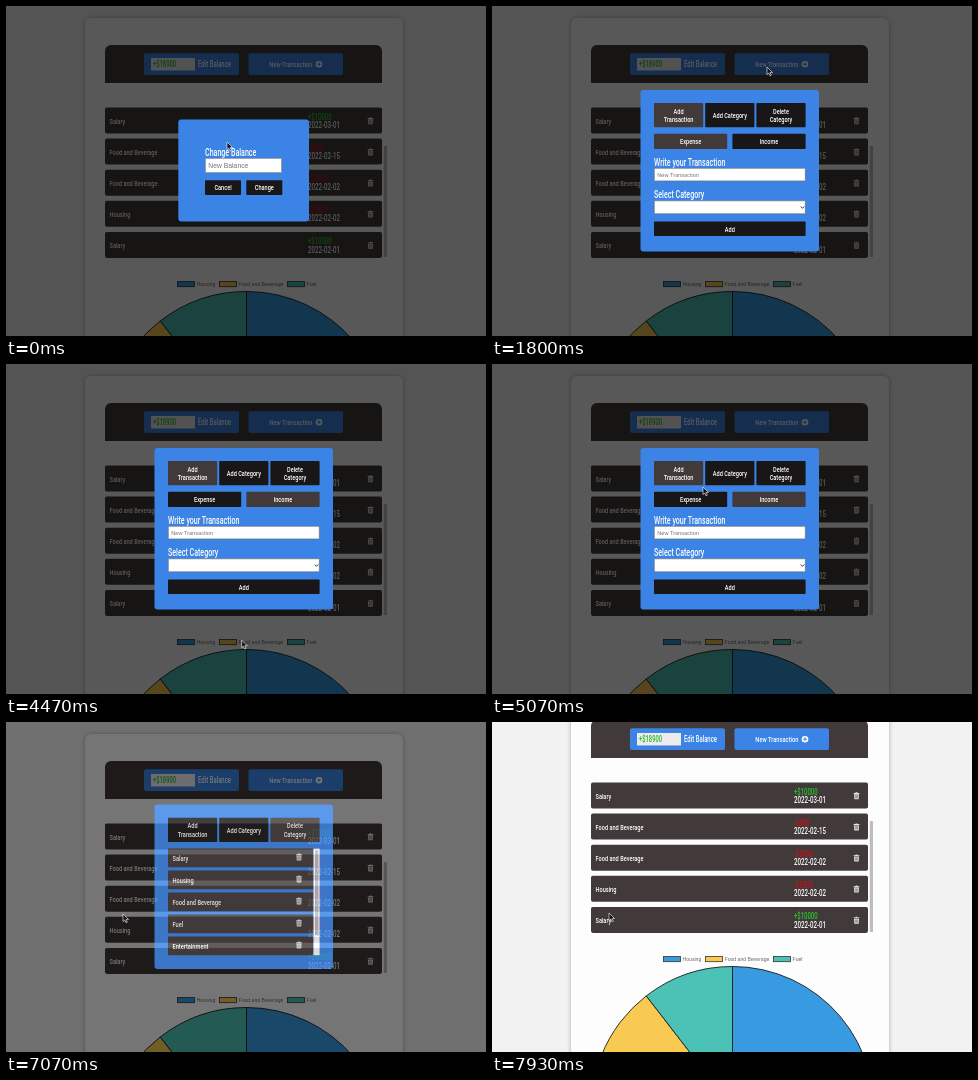
An HTML page that plays this animation: 480x330 px, repeating every 8 s.

```html
<!DOCTYPE html>
<html lang="en">
<head>
<meta charset="utf-8">
<title>Budget tracker</title>
<style>
  html, body { margin: 0; width: 100%; height: 100%; overflow: hidden; background: #f2f2f2; }
  svg { display: block; width: 100%; height: 100%; }
  .ui { font-family: Roboto, "Open Sans", sans-serif; font-weight: 500; }
  .sans { font-family: "Liberation Sans", Arial, sans-serif; }
  .card { filter: drop-shadow(0 0 2px rgba(0, 0, 0, .3)); }
</style>
</head>
<body>
<svg id="stage" viewBox="0 0 480 330" xmlns="http://www.w3.org/2000/svg"></svg>
<script>
const LOOP = 8000;
const BLUE = '#3b84e6', DARK = '#423a3a', BLACK = '#181617';
const CONDENSE = 0.71; // one narrow setting for the whole interface face

// ---- drawing helpers: text is placed by its vertical centre ----
const rect = (x, y, w, h, fill, r = 0, extra = '') =>
  `<rect x="${x}" y="${y}" width="${w}" height="${h}" rx="${r}" fill="${fill}" ${extra}/>`;

const label = (x, y, text, { size = 8, fill = '#fff', anchor = 'start' } = {}) =>
  `<text class="ui" transform="translate(${x} ${y + size * 0.36}) scale(${CONDENSE} 1)"
    font-size="${size}" fill="${fill}" text-anchor="${anchor}">${text}</text>`;

const small = (x, y, text, size, fill) =>
  `<text class="sans" x="${x}" y="${y + size * 0.36}" font-size="${size}" fill="${fill}">${text}</text>`;

const group = (id, body) => `<g id="${id}">${body}</g>`;

const trash = (x, y) => `<g transform="translate(${x} ${y})" fill="#e4e2e2">
  <path d="M-2.9-2.9h1.7l.5-.7h1.4l.5.7h1.7v.9h-5.8z"/>
  <path d="M-2.5-1.6h5l-.3 5h-4.4z"/>
  <path d="M-1.1-.8v3.3M0-.8v3.3M1.1-.8v3.3" stroke="${DARK}" stroke-width=".45"/></g>`;

// A button with one or two centred lines
function button(x, y, w, h, text, fill = BLACK) {
  const lines = text.split('|');
  const first = y + h / 2 - (lines.length - 1) * 4.4;
  return rect(x, y, w, h, fill, 0.8) + lines.map((line, i) =>
    label(x + w / 2, first + i * 8.8, line, { size: 7.9, anchor: 'middle' })).join('');
}

const field = (x, y, w, h, hint, size) =>
  rect(x + 0.3, y + 0.3, w - 0.6, h - 0.6, '#fff', 0.5, 'stroke="#666" stroke-width=".6"') +
  small(x + 3.3, y + h / 2, hint, size, '#757575');

// ---- page ----
function slice(from, to, fill) {
  const cx = 240.5, cy = 426.5, r = 141;
  const rim = deg => {
    const a = deg * Math.PI / 180;
    return `${cx + r * Math.sin(a)} ${cy - r * Math.cos(a)}`;
  };
  const large = to - from > 180 ? 1 : 0;
  return `<path d="M${cx} ${cy}L${rim(from)}A${r} ${r} 0 ${large} 1 ${rim(to)}Z"
    fill="${fill}" stroke="#1c1c1c" stroke-width=".9"/>`;
}

function page() {
  const rows = [
    ['Salary', '+$10000', '2022-03-01'],
    ['Food and Beverage', '-$500', '2022-02-15'],
    ['Food and Beverage', '-$5000', '2022-02-02'],
    ['Housing', '-$5000', '2022-02-02'],
    ['Salary', '+$10000', '2022-02-01'],
  ];
  const legend = [
    [171, 'Housing', '#389be2'],
    [213, 'Food and Beverage', '#f9ca52'],
    [281, 'Fuel', '#4cc2b6'],
  ];
  const header =
    `<path d="M99 77V45a6 6 0 0 1 6-6H370a6 6 0 0 1 6 6V77z" fill="${DARK}"/>` +
    rect(138, 47.3, 95, 21.7, BLUE, 2) +
    rect(145, 52, 44, 12.5, '#ececec') +
    label(147, 58.2, '+$18900', { size: 8.2, fill: '#27b32c' }) +
    label(192, 58.2, 'Edit Balance', { size: 8.4 }) +
    rect(242.5, 47.3, 94.5, 21.7, BLUE, 2) +
    label(263.3, 58.2, 'New Transaction', { size: 8.1 }) +
    `<circle cx="313" cy="58.2" r="3.3" fill="#fff"/>
     <path d="M311.1 58.2h3.8M313 56.3v3.8" stroke="${BLUE}" stroke-width="1"/>`;

  const list = rows.map(([name, amount, date], i) => {
    const y = 101.5 + i * 31.1, mid = y + 13;
    const tint = amount[0] === '+' ? '#25c82d' : '#c81018';
    return rect(99, y, 277, 26, DARK, 1.8) +
      label(103.5, mid + 0.4, name, { size: 7.9 }) +
      label(302, mid - 3.9, amount, { size: 8.4, fill: tint }) +
      label(302, mid + 4.5, date, { size: 8.7 }) +
      trash(364.5, mid + 0.4);
  }).join('');

  const chart = legend.map(([x, name, fill]) =>
    rect(x + 0.4, 275.5, 17, 5.2, fill, 0, 'stroke="#333" stroke-width=".8"') +
    small(x + 19.6, 278.2, name, 5.1, '#666')).join('') +
    slice(0, 200, '#389be2') + slice(200, 322.3, '#f9ca52') + slice(322.3, 360, '#4cc2b6');

  return `<rect class="card" x="79" y="12" width="318" height="600" rx="6" fill="#fdfdfd"/>` +
    header + list + rect(377.8, 140, 3.2, 111, '#bdbdbd', 0.5) + chart;
}

// ---- dialogs ----
const panel = (top, bottom) => rect(148.5, top, 178.5, bottom - top, BLUE, 3);

const tabs = (y, active) => ['Add|Transaction', 'Add Category', 'Delete|Category'].map((text, i) =>
  button(162 + i * 51.2, y, 49.2, 24.3, text, i === active ? DARK : BLACK)).join('');

const kinds = (y, active) => ['Expense', 'Income'].map((text, i) =>
  button(162 + i * 78.4, y, 73.2, 15.3, text, i === active ? DARK : BLACK)).join('');

const heading = (x, y, text) => label(x, y, text, { size: 10 });

const balanceDialog = () =>
  rect(172.3, 113.5, 130.7, 102, BLUE, 3) +
  heading(199, 146.3, 'Change Balance') +
  field(199, 152, 77, 15, 'New Balance', 6.8) +
  button(199, 174.3, 36, 14.7, 'Cancel') +
  button(240.3, 174.3, 36, 14.7, 'Change');

const transactionDialog = () =>
  panel(84, 245.5) + tabs(97, 0) +
  group('expense', kinds(127.7, 0)) + group('income', kinds(127.7, 1)) +
  heading(162, 156, 'Write your Transaction') +
  field(162, 162, 151.6, 13.2, 'New Transaction', 5.6) +
  heading(162, 188.5, 'Select Category') +
  field(162, 194.5, 151.6, 13.6, '', 5.6) +
  '<path d="M308.8 200.5l1.7 1.8 1.7-1.8" fill="none" stroke="#222" stroke-width=".9"/>' +
  button(162, 215.4, 151.6, 14.7, 'Add');

const categoryDialog = () =>
  panel(100, 229) + tabs(113, 1) + kinds(143.5, 1) +
  heading(162, 172, 'Write your Category') +
  field(162, 178, 151.6, 13.2, 'New Category', 5.6) +
  button(162, 198.5, 151.6, 14.7, 'Add');

const deleteDialog = () =>
  panel(82.5, 247) + tabs(95.7, 2) +
  ['Salary', 'Housing', 'Food and Beverage', 'Fuel', 'Entertainment'].map((name, i) => {
    const y = 126.6 + i * 22;
    return rect(162, y, 145.5, 18.6, DARK, 1) + label(166.5, y + 9.6, name) + trash(293, y + 8.6);
  }).join('') +
  rect(307.5, 126.6, 6.1, 106.6, '#fff') + rect(309, 128, 3.4, 85, '#bdbdbd', 1.2);

// ---- pointers, hot spot at 0,0 ----
const pointers = () =>
  group('arrow', `<path d="M0 0V7.6L1.8 6 3 8.8 4.3 8.2 3.1 5.5H5.5Z"
    fill="#111" stroke="#fff" stroke-width=".6"/>`) +
  group('hand', `<path d="M-.6 0Q.1-.7.7 0V2.7L3.9 3.4Q4.5 3.6 4.4 4.4L3.8 7.8H.1L-2.3 4.8Q-2.2 3.7-.6 4.6Z"
    fill="#111" stroke="#fff" stroke-width=".6"/>`) +
  group('beam', `<path d="M-1.5-3Q0-3 0-2V2Q0 3-1.5 3M1.5-3Q0-3 0-2V2Q0 3 1.5 3"
    fill="none" stroke="#111" stroke-width=".8"/>`);

document.getElementById('stage').innerHTML =
  rect(0, 0, 480, 330, '#f2f2f2') +
  group('page', page()) +
  group('layer', rect(0, 0, 480, 330, 'rgba(0,0,0,.65)') +
    group('balance', balanceDialog()) +
    group('transaction', transactionDialog()) +
    group('category', categoryDialog()) +
    group('remove', deleteDialog())) +
  group('cursor', pointers());

// ---- timeline: [ms, values...] ----
const opacityKeys = [[0, 1], [640, 1], [860, 0], [1490, 0], [1720, 1], [7030, 1], [7260, 0], [LOOP, 0]];
const scrollKeys = [[0, 0], [7480, 0], [LOOP, 47.3]];
const pathKeys = [
  [0, 221, 136], [70, 221, 136], [530, 316, 278], [720, 316, 278],
  [1400, 275, 61], [2340, 275, 61], [2850, 270, 134], [2990, 272, 136],
  [3200, 272, 148], [3400, 260, 198], [3530, 238, 166], [3640, 238, 166],
  [4330, 236, 278], [4430, 236, 278], [5070, 211, 123], [5270, 236, 110],
  [5340, 237, 112], [5600, 262, 317], [5800, 330, 180], [5930, 305, 54],
  [6070, 281, 111], [6300, 281, 111], [6600, 205, 190], [6930, 117, 192], [LOOP, 117, 191],
];
const dialogKeys = [[0, 'balance'], [1200, 'transaction'], [5320, 'category'], [6240, 'remove']];
const kindKeys = [[0, 'expense'], [2960, 'income']];
const pointerKeys = [
  [0, 'arrow'], [2800, 'hand'], [3120, 'arrow'], [3460, 'beam'], [3760, 'arrow'],
  [5180, 'hand'], [5400, 'arrow'], [6030, 'hand'], [6420, 'arrow'],
];

const $ = id => document.getElementById(id);
const ease = p => p * p * (3 - 2 * p);
const linear = p => p;

function tween(keys, t, curve) {
  const i = Math.max(1, keys.findIndex(key => key[0] > t));
  const [from, ...a] = keys[i - 1], [to, ...b] = keys[i];
  const p = curve((t - from) / (to - from));
  return a.map((v, n) => v + (b[n] - v) * p);
}

function showOnly(keys, t) {
  const now = keys.filter(key => key[0] <= t).pop()[1];
  for (const [, id] of keys) $(id).style.display = id === now ? '' : 'none';
}

function draw(time) {
  const t = Math.max(0, time) % LOOP;
  const [x, y] = tween(pathKeys, t, ease);
  $('cursor').setAttribute('transform', `translate(${x} ${y})`);
  $('page').setAttribute('transform', `translate(0 ${-tween(scrollKeys, t, linear)[0]})`);
  $('layer').setAttribute('opacity', tween(opacityKeys, t, linear)[0]);
  showOnly(dialogKeys, t);
  showOnly(kindKeys, t);
  showOnly(pointerKeys, t);
}

const start = performance.now();
function tick() {
  draw(performance.now() - start);
  requestAnimationFrame(tick);
}
tick();
</script>
</body>
</html>
```
